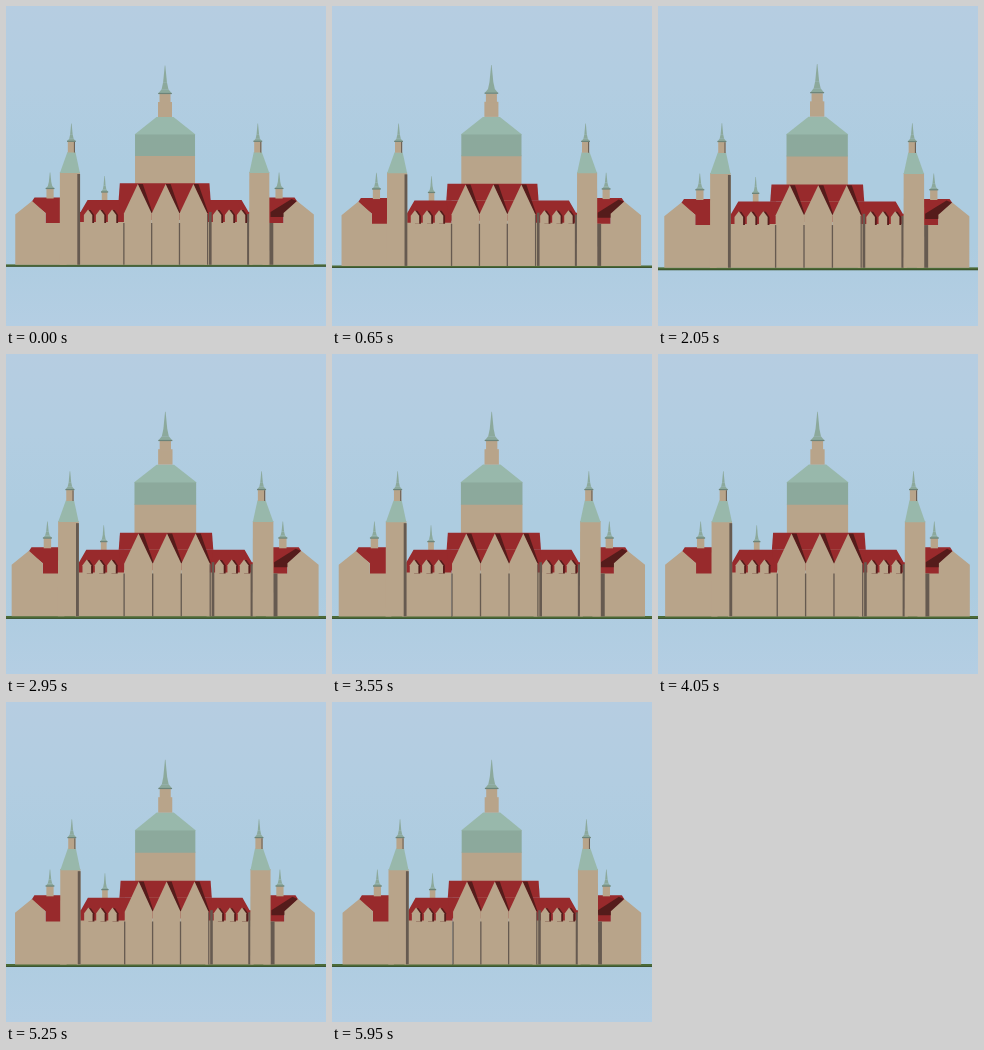
Recreate the animation shown at these times as an HTML page with a canvas. Size 320 by 320 pixels, loop 6 s.

```html
<!DOCTYPE html>
<html lang="en">
<head>
<meta charset="utf-8">
<title>Town hall model</title>
<style>
html, body { margin: 0; width: 100%; height: 100%; overflow: hidden; background: #b1cce2; }
canvas { display: block; width: 320px; height: 320px; }
</style>
</head>
<body>
<canvas id="stage" width="320" height="320"></canvas>
<script>
const ctx = document.getElementById('stage').getContext('2d');
const LOOP = 6000, STEP = 50;
const AXIS = 158.5, PIVOT = 125, BASE = 258.8, EAVES = 217;
const WALL = '#b8a48a', SHADE = '#665a50', RING = '#6c8479';
const RED = '#982a2c', DARK_RED = '#551c1b';
const TEAL = '#98b8ab', TEAL_LOW = '#8ca99c';

// Camera: one slow dolly, a rising tilt and a gentle sideways swing
const wave = (t, period) => (1 - Math.cos(2 * Math.PI * t / period)) / 2;
const zoomAt = t => 1 + 0.028 * wave(t, LOOP);
const tiltAt = t => 1 + 0.027 * Math.sin(Math.PI / 2 * Math.min(1, t / 3300));
const swayAt = t => 0.1 + 2.65 * wave(t, 2400);

let zoom = 1, tilt = 1, sway = 0, depth = 0, side = 1;
const px = x => AXIS + side * x * zoom + sway * depth;
const py = y => PIVOT + (y - PIVOT) * tilt;

// x counts outwards from the axis, mirrored by side
function poly(color, ...p) {
  ctx.fillStyle = color;
  ctx.beginPath();
  for (let i = 0; i < p.length; i += 2) ctx.lineTo(px(p[i]), py(p[i + 1]));
  ctx.closePath();
  ctx.fill();
}

const box = (color, x1, y1, x2, y2) => poly(color, x1, y1, x2, y1, x2, y2, x1, y2);
const taper = (color, x, top, a, bottom, b) =>
  poly(color, x - a, top, x + a, top, x + b, bottom, x - b, bottom);

// Concave pointed cap
function spire(x, top, bottom, half) {
  const at = f => top + (bottom - top) * f;
  taper(TEAL_LOW, x, top, 0.25, at(0.6), half * 0.28);
  taper(TEAL_LOW, x, at(0.6), half * 0.28, at(0.85), half * 0.5);
  taper(TEAL_LOW, x, at(0.85), half * 0.5, bottom, half);
  box(RING, x - half, bottom - 0.6, x + half, bottom + 0.6);
}

function turret(x, eave, half) {
  taper(WALL, x, eave, half, eave + 10, half);
  spire(x, eave - 16, eave, half + 0.8);
}

function dome() {
  depth = 0.25;
  side = 1;
  taper(WALL, 0.5, 149, 30, 200, 30);
  taper(TEAL_LOW, 0.5, 128, 30, 150, 30);
  taper(TEAL, 0.5, 111, 8.5, 128.4, 30.5);
  taper(WALL, 0.5, 96, 7, 111, 7);
  taper(WALL, 0.5, 88, 5.5, 97, 5.5);
  spire(0.5, 59.5, 87.5, 6.8);
}

function wing() {
  depth = 0.5;
  poly(RED, 130, 191.5, 100, 191.5, 100, 218, 119, 218, 119, 207, 133, 196);
  if (side > 0) poly(DARK_RED, 132, 195, 127, 193, 106, 206, 106, 211, 119, 211);
  turret(114.5, 182.5, 3.6);
  poly(WALL, 149.3, 208.5, 132.5, 195, 119, 207, 119, EAVES, 98, EAVES, 98, BASE, 149.3, BASE);
}

function dormer(x) {
  poly(DARK_RED, x, 204, x + side * 2.5, 204, x + side * 6, 209, x + side * 6, EAVES, x, EAVES);
  poly(WALL, x - 4.2, EAVES, x - 4.2, 209, x, 203.5, x + 4.2, 209, x + 4.2, EAVES);
}

function link() {
  depth = 0.75;
  if (side < 0) turret(60, 186, 2.8);
  poly(RED, 40, 194, 77, 194, 84, 206, 88, 206, 88, EAVES, 40, EAVES);
  box(WALL, 40, 216, 88, BASE);
  for (let x = 52.5; x < 80; x += 12) dormer(x);
}

function hall() {
  const pitch = 27.8, half = pitch / 2, mid = 1;
  depth = 1.2;
  side = 1;
  taper(RED, 0, 177.3, 44.8, 194, 46);
  taper(RED, 0, 194, 46, 214, 43);
  for (let i = -1; i <= 1; i++) {
    const x = mid + i * pitch;
    poly(DARK_RED, x, 178, x + 5, 178, x + half + 1, 207, x + half - 1, 207);
    poly(WALL, x - half, 207.5, x, 178, x + half, 207.5, x + half, BASE, x - half, BASE);
    box(SHADE, x - half - 0.7, EAVES, x - half + 0.6, BASE);
  }
  box(SHADE, 42.4, 208, 43.6, BASE);
  box(SHADE, 44.4, 206, 47, BASE);
}

function tower() {
  const x = 94.7, cap = 93.2;
  depth = 1;
  if (side > 0) {
    box(SHADE, 82.5, 208, 85, BASE);
    box(SHADE, 104, EAVES, 108.7, BASE);
  }
  taper(WALL, x, 166, 10, BASE, 10.2);
  if (side < 0) box(SHADE, x - 10.2, 168, x - 7.4, BASE);
  poly(TEAL, cap - 4, 146, cap + 4, 146, x + 10, 167, x - 10, 167);
  taper(WALL, cap, 135, 3.6, 146.5, 3.6);
  const edge = cap + side * 3;
  taper(SHADE, edge, 136, 0.5, 146.5, 0.5);
  spire(cap, 117.5, 135.3, 4.4);
}

function ground() {
  const y = py(BASE) - 0.4, thick = 2.2 + (tilt - 1) * 25;
  ctx.fillStyle = '#4c6a36';
  ctx.fillRect(0, y, 320, thick);
  ctx.fillStyle = '#33482a';
  ctx.fillRect(0, y + thick - 0.7, 320, 0.7);
}

const sky = ctx.createLinearGradient(0, 0, 0, 320);
['#b6cde1', '#b2cde1', '#adcce0', '#adcce0', '#b4cee3']
  .forEach((color, i) => sky.addColorStop(i / 4, color));

const both = part => [-1, 1].forEach(s => { side = s; part(); });

function draw(t) {
  zoom = zoomAt(t);
  tilt = tiltAt(t);
  sway = swayAt(t);
  ctx.fillStyle = sky;
  ctx.fillRect(0, 0, 320, 320);
  ground();
  dome();
  both(wing);
  both(link);
  hall();
  both(tower);
}

const start = performance.now();
function tick() {
  const t = (performance.now() - start) % LOOP;
  draw(Math.floor(t / STEP) * STEP);
  requestAnimationFrame(tick);
}
tick();
</script>
</body>
</html>
```
